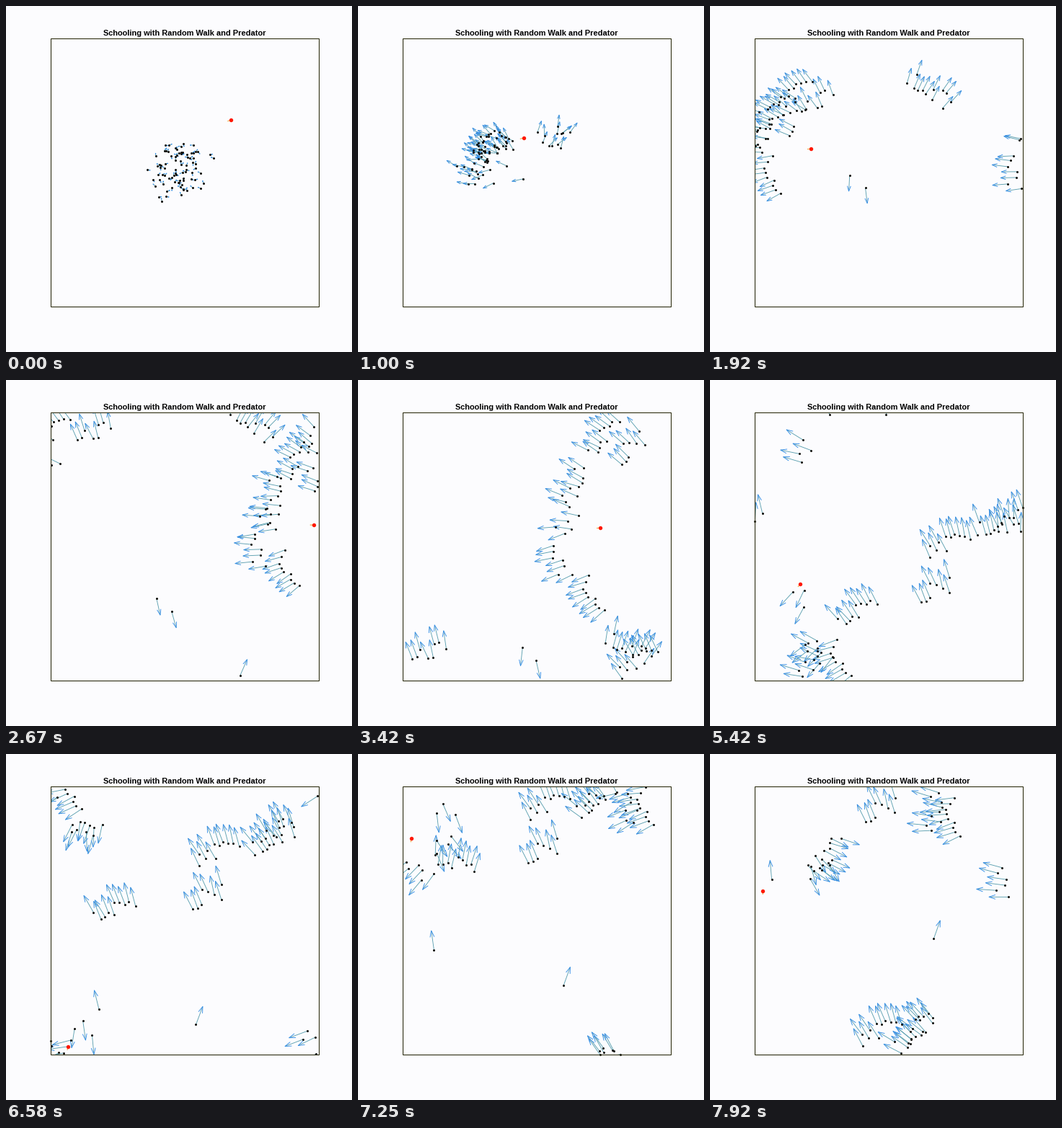
These frames come from a looping animation (480x480 px, 8 s). A matplotlib script:

```python
import numpy as np
import matplotlib.pyplot as plt
from matplotlib.animation import FuncAnimation
from matplotlib.collections import LineCollection
from matplotlib.patches import Rectangle

FRAMES, LOOP = 96, 8000
PT = 0.9                                   # points per pixel at 80 dpi
CORNER, SIDE = np.array([62, 45]), 372
HOME = np.array([248, 235])                # where the whole shoal starts
SETTLE = 23                                # frames until the schools have formed
KEYS = (0, SETTLE, 41, 65, 95, 111)
BACK = "#fcfcfe"

rng = np.random.default_rng(12)


class Route:
    """Smooth path through points at key frames, unrolled past the borders."""

    def __init__(self, keys, pts, from_rest=False):
        self.k, self.p = np.array(keys), np.array(pts, float)
        h = np.diff(self.k)[:, None]
        slope = np.diff(self.p, axis=0) / h
        mid = (slope[:-1] * h[1:] + slope[1:] * h[:-1]) / (h[:-1] + h[1:])
        first = 0 * mid[0] if from_rest else 2 * slope[0] - mid[0]
        self.m = np.vstack([first, mid, 2 * slope[-1] - mid[-1]])

    def pos(self, t):
        i = min(np.searchsorted(self.k, t, "right") - 1, len(self.k) - 2)
        h = self.k[i + 1] - self.k[i]
        s = (t - self.k[i]) / h
        rise = s * s * (3 - 2 * s)
        return (self.p[i] * (1 - rise) + self.p[i + 1] * rise
                + self.m[i] * h * s * (1 - s)**2
                - self.m[i + 1] * h * s * s * (1 - s))

    def heading(self, t):
        dx, dy = self.pos(t + 0.1) - self.pos(t - 0.1)
        return np.arctan2(dy, dx)


class School:
    """n fish swimming abreast: a wide front across the heading."""

    def __init__(self, n, *pts):
        start = HOME + 0.1 * (np.array(pts[0]) - HOME)
        self.route = Route(KEYS[:len(pts) + 1], [start, *pts], from_rest=True)
        self.rank = (2 * np.arange(n) + 1) / n - 1
        self.across = (12 + 2 * n) * self.rank
        self.along = rng.uniform(-12, 12, n)
        self.wobble = rng.uniform(-1, 1, n)
        r, a = 38 * np.sqrt(rng.random(n)), rng.uniform(0, 2 * np.pi, n)
        self.crowd = np.stack([r * np.cos(a), r * np.sin(a)], 1)

    def at(self, t):
        s = min(t / SETTLE, 1)
        formed = s * s * (3 - 2 * s)
        a = self.route.heading(t)
        front = np.stack([self.along * np.cos(a) - self.across * np.sin(a),
                          self.along * np.sin(a) + self.across * np.cos(a)], 1)
        pos = self.route.pos(t) + self.crowd * (1 - formed) + front * formed
        aim = a + 0.15 * self.rank + self.wobble * (0.12 + 3 * (1 - formed)**3)
        return pos, aim


def wrap(p):
    return CORNER + (p - CORNER) % SIDE


schools = [
    School(12, (305, 118), (376, 0), (402, -169), (282, -358)),
    School(8, (149, 135), (99, 8), (50, -178), (-80, -360)),
    School(11, (115, 122), (14, 16), (-42, -147), (-137, -362)),
    School(8, (113, 153), (5, 93), (-60, -82), (-136, -296)),
    School(10, (85, 145), (-35, 75), (-170, -55), (-205, -230), (-11, -83)),
    School(9, (73, 169), (-70, 146), (-232, 15), (-430, 80), (-580, 40)),
    School(4, (73, 188), (-73, 192), (-240, 100), (-228, 156)),
    School(3, (60, 196), (-93, 215), (-246, 299), (-222, 521)),
    School(6, (52, 234), (-88, 254), (-221, 376), (-335, 550), (-511, 486)),
    School(9, (88, 235), (-45, 297), (-190, 387), (-405, 460)),
    School(1, (194, 245), (228, 381), (160, 413), (84, 165)),
    School(1, (216, 257), (248, 394), (246, 416), (312, 252)),
]
hunter = Route((0, 23, 41, 51, 65, 78, 95),
               [(312, 158), (140, 198), (-36, 205), (-137, 221),
                (-247, 283), (-286, 406), (-299, 562)])

fig = plt.figure(figsize=(6, 6), dpi=80, facecolor=BACK)
ax = fig.add_axes([0, 0, 1, 1])
ax.set(xlim=(0, 480), ylim=(480, 0))
ax.axis("off")

box = Rectangle(CORNER, SIDE, SIDE, fc="none", ec="#2e2e12", lw=1.1 * PT, zorder=5)
ax.add_patch(box)
ax.text(248, 41, "Schooling with Random Walk and Predator", ha="center",
        va="baseline", fontsize=11 * PT, family="Liberation Sans",
        weight="bold", color="black")


def strokes(color, width, z):
    lines = LineCollection([], colors=color, linewidths=width * PT, zorder=z)
    ax.add_collection(lines)
    lines.set_clip_path(box)
    return lines


shafts = strokes("#5ca0b0", 0.9, 1)
barbs = strokes("#338de6", 0.9, 2)
nose = strokes("#f0a030", 1, 3)
dots, = ax.plot([], [], "o", ms=3 * PT, color="#0c0c08", mew=0, zorder=4)
killer, = ax.plot([], [], "o", ms=5.4 * PT, color="#ff1800", mew=0, zorder=6)


def ray(angle, length):
    return length * np.stack([np.cos(angle), np.sin(angle)], -1)


def update(t):
    pos, aim = (np.concatenate(c) for c in zip(*(s.at(t) for s in schools)))
    pos = wrap(pos)
    size = 27 - 23 * np.exp(-t / 16)       # fish speed up as they flee
    tip = pos + ray(aim, size)
    wings = [tip - ray(aim + k, 0.35 * size) for k in (0.32, -0.32)]
    shafts.set_segments(np.stack([pos, tip], 1))
    barbs.set_segments(np.stack([wings[0], tip, wings[1]], 1))
    dots.set_data(*pos.T)

    p = wrap(hunter.pos(t))
    nose.set_segments([[p, p + ray(hunter.heading(t), 5)]])
    killer.set_data([p[0]], [p[1]])
    return shafts, barbs, nose, dots, killer


anim = FuncAnimation(fig, update, frames=FRAMES, interval=LOOP / FRAMES,
                     repeat=True, repeat_delay=0, blit=False)
plt.show()
```
